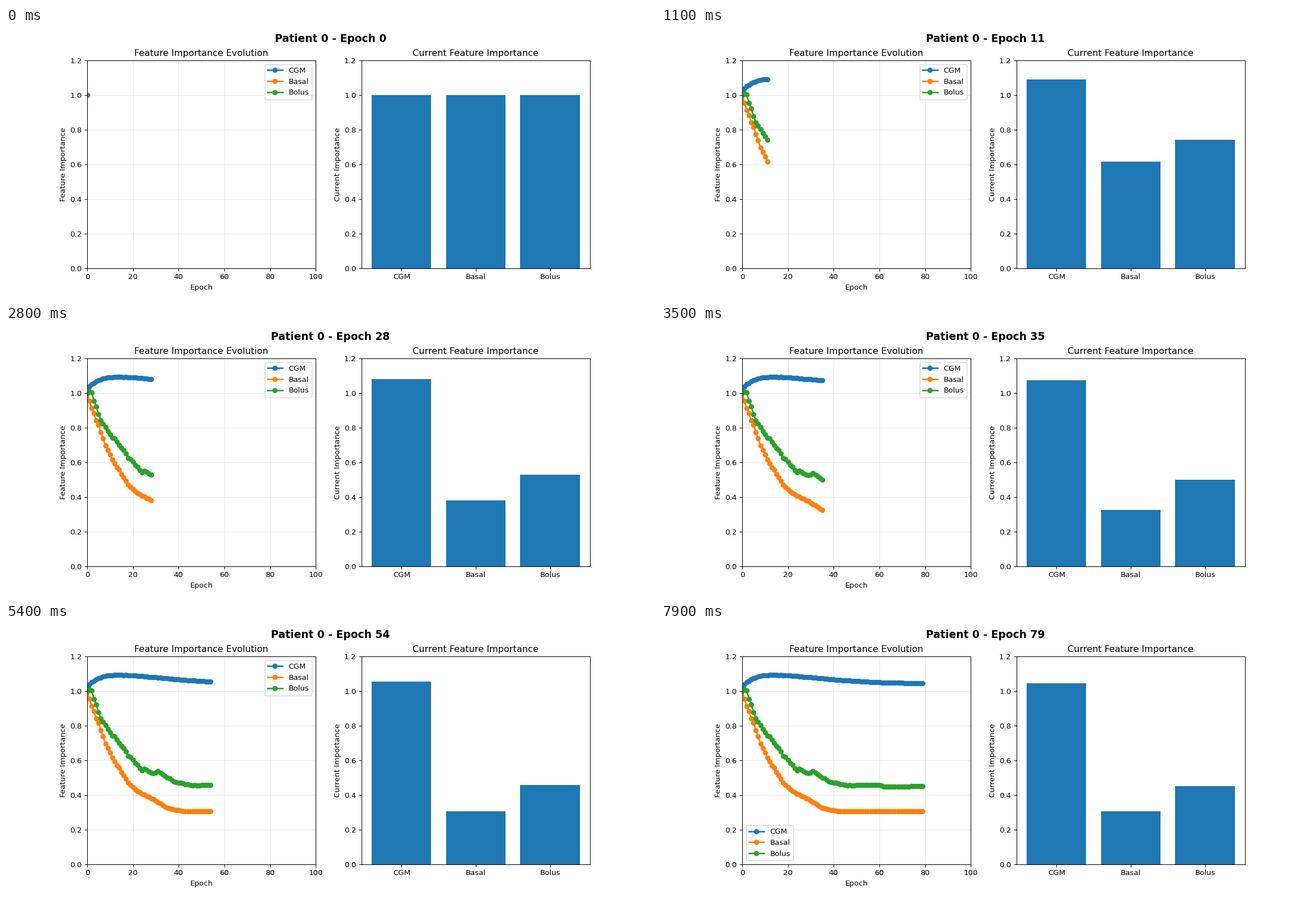
These frames come from a looping animation (1159 px wide and 483 px high, 8 s). A matplotlib script:

```python
import matplotlib.pyplot as plt
import numpy as np
from matplotlib.animation import FuncAnimation

plt.rcParams["font.family"] = "DejaVu Sans"

W, H = 1159, 483
DPI = W / 12  # a 12 inch wide figure
EPOCHS = 80
NAMES = ["CGM", "Basal", "Bolus"]

epochs = np.arange(EPOCHS)
rng = np.random.default_rng(4)


def curve(knots, jitter):
    """Trend through (epoch, value) knots with jitter that settles down."""
    trend = np.interp(epochs, *zip(*knots))
    fade = np.exp(-(epochs / 36) ** 4) * (epochs > 1)
    wobble = np.clip(rng.normal(size=EPOCHS), -1.5, 1.5)
    return trend + jitter * fade * wobble


cgm = curve([(0, 1), (1, 1.04), (4, 1.068), (8, 1.088), (13, 1.093),
             (20, 1.09), (30, 1.079), (43, 1.063), (60, 1.05), (79, 1.044)],
            jitter=0.0005)
basal = curve([(0, 1), (2, 0.91), (5, 0.813), (8, 0.702), (12, 0.594),
               (18, 0.47), (22, 0.418), (28, 0.384), (35, 0.324),
               (43, 0.305), (79, 0.305)],
              jitter=0.003)
bolus = curve([(0, 1), (1, 1.01), (2, 0.997), (5, 0.876), (8, 0.797),
               (18, 0.632), (23, 0.554), (29, 0.525), (31, 0.538),
               (38, 0.476), (46, 0.456), (60, 0.457), (62, 0.449),
               (79, 0.45)],
              jitter=0.005)
series = [cgm, basal, bolus]

# The tiny nudge keeps the pixel size from truncating one short.
fig, (ax1, ax2) = plt.subplots(
    1, 2, figsize=((W + 1e-6) / DPI, (H + 1e-6) / DPI), dpi=DPI)
title = fig.suptitle("", fontsize=14, fontweight="bold")

lines = [ax1.plot([], [], marker="o", linewidth=2, markersize=6, label=name)[0]
         for name in NAMES]
ax1.set(xlim=(0, 100), ylim=(0, 1.2), xlabel="Epoch",
        ylabel="Feature Importance", title="Feature Importance Evolution")
ax1.grid(True, alpha=0.3)
ax1.legend(loc="best")  # moves by itself once the curves reach it

bars = ax2.bar(NAMES, [1, 1, 1])
ax2.set(ylim=(0, 1.2), ylabel="Current Importance",
        title="Current Feature Importance")


def update(epoch):
    title.set_text(f"Patient 0 - Epoch {epoch}")
    for line, bar, values in zip(lines, bars, series):
        line.set_data(epochs[:epoch + 1], values[:epoch + 1])
        bar.set_height(values[epoch])
    return [title, *lines, *bars]


anim = FuncAnimation(fig, update, frames=EPOCHS, init_func=lambda: update(0),
                     interval=100, repeat=True, blit=False)
plt.show()
```
